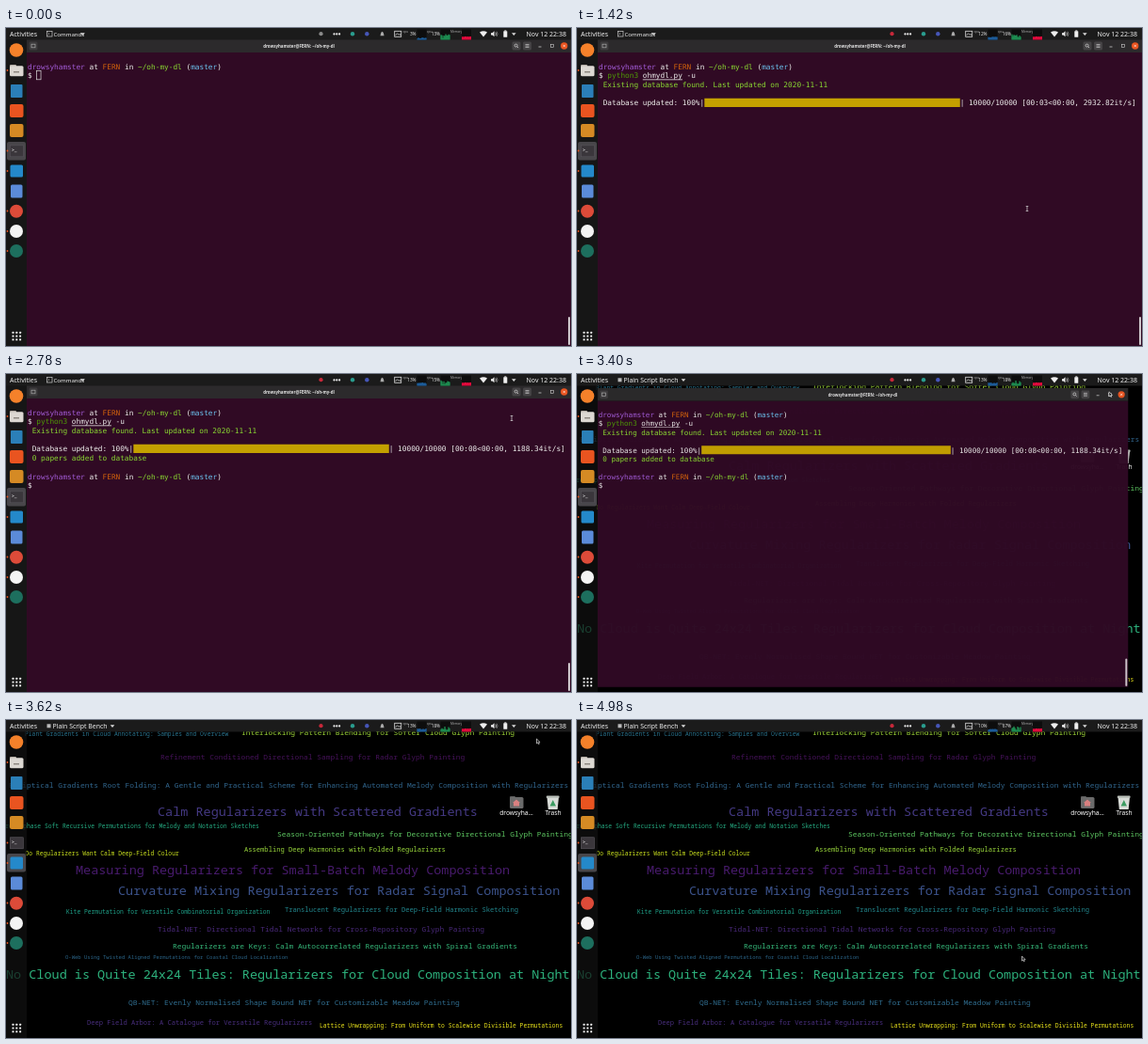
An HTML page with a canvas that plays this animation: 600x338 px, repeating every 5000 ms.

```html
<!DOCTYPE html>
<html lang="en">
<head>
<meta charset="utf-8">
<title>Paper wallpaper updater</title>
<style>
  html, body { margin: 0; width: 100%; height: 100%; overflow: hidden; background: #000; }
  canvas { display: block; width: 100vw; height: 100vh; }
</style>
</head>
<body>
<canvas></canvas>
<script>
const W = 600, H = 338, LOOP = 5000;
const UI = '"Noto Sans", sans-serif';
const MONO = '"DejaVu Sans Mono", monospace';
const CLOUD = '"Noto Sans Mono", monospace';
const canvas = document.querySelector('canvas');
const ctx = canvas.getContext('2d');

// Cue times in ms
const TYPE_FROM = 40, TYPE_TO = 470, FOUND = 550, BAR = 590, FILL = 660,
      FULL = 1420, DONE = 2560, BLUR = 3380, HIDE = 3400, HIDDEN = 3440;

// Console grid
const COL = 4.68, ROW = 9.7, LEFT = 23, BASE = 43.6, COLS = 122;
const CELL_FONT = `${COL / 0.602}px ${MONO}`;
const GREEN = '#8ad832', WHITE = '#eeeeec';
const PROMPT = [['drowsyhamster', '#a25bd6'], [' at ', WHITE], ['FERN', '#d2620c'],
  [' in ', WHITE], ['~/oh-my-dl', GREEN], [' (', WHITE], ['master', '#6cc4f0'], [')', WHITE]];
const COMMAND = [['python3', '#4e9a06'], [' ', WHITE], ['ohmydl.py', WHITE, true], [' -u', WHITE]];

// Word cloud: text, x, middle y, size step, colour
const STEP = 0.7937;
const TITLES = [
  ['Plant Gradients in Cloud Annotating: Samples and Overview', 20, 15, 8, '#28708a'],
  ['Interlocking Pattern Blending for Softer Cloud Glyph Painting', 250, 13, 10, '#a0da39'],
  ['Refinement Conditioned Directional Sampling for Radar Glyph Painting', 164, 39, 10, '#451259'],
  ['Elliptical Gradients Root Folding: A Gentle and Practical Scheme for Enhancing Automated Melody Composition with Regularizers', 3, 69, 10, '#31668e'],
  ['Calm Regularizers with Scattered Gradients', 161, 98, 17, '#443983'],
  ['Cross-phase Soft Recursive Permutations for Melody and Notation Sketches', -4.6, 113, 8, '#25ab82'],
  ['Season-Oriented Pathways for Decorative Directional Glyph Painting', 288, 121, 10, '#5ec962'],
  ['Assembling Deep Harmonies with Folded Regularizers', 253, 138, 9, '#9bd93c'],
  ['Do Regularizers Want Calm Deep-Field Colour', 20.5, 142, 8, '#cae11f'],
  ['Measuring Regularizers for Small-Batch Melody Composition', 74, 160, 17, '#481b6d'],
  ['Curvature Mixing Regularizers for Radar Signal Composition', 119, 182, 17, '#3b528b'],
  ['Translucent Regularizers for Deep-Field Harmonic Sketching', 296, 202, 9, '#22868d'],
  ['Kite Permutation for Versatile Combinatorial Organization', 64, 204, 8, '#1fa088'],
  ['Tidal-NET: Directional Tidal Networks for Cross-Repository Glyph Painting', 161, 222, 10, '#482878'],
  ['Regularizers are Keys: Calm Autocorrelated Regularizers with Spiral Gradients', 177, 240, 10, '#35b779'],
  ['O-Web Using Twisted Aligned Permutations for Coastal Cloud Localization', 63, 252, 7, '#2b668a'],
  ['No Cloud is Quite 24x24 Tiles: Regularizers for Cloud Composition at Night', 0, 270.5, 17, '#2db27d'],
  ['QB-NET: Evenly Normalised Shape Bound NET for Customizable Meadow Painting', 130, 300, 10, '#2f6c8e'],
  ['Deep Field Arbor: A Catalogue for Versatile Regularizers', 86, 322, 9, '#472d7b'],
  ['Lattice Unwrapping: From Uniform to Scalewise Divisible Permutations', 333, 325, 8, '#ece51b'],
];

// Time, first load reading, second load reading
const LOADS = [[0, 3, 13], [300, 6, 15], [560, 9, 19], [1000, 12, 16], [1500, 5, 12],
  [1900, 1, 10], [2500, 9, 15], [2780, 13, 15], [3100, 13, 18], [3700, 10, 17], [4400, 10, 67]];

// Pointer path: time, x, y
const POINTER = [[1420, 478, 192], [1680, 537, 47], [3120, 537, 47], [3370, 566, 19],
  [3440, 563.5, 21], [3620, 563.5, 21], [4000, 472.5, 252]];

const latest = (list, t) => list.filter(item => item[0] <= t).pop();
const clamp = v => Math.max(0, Math.min(1, v));
const noise = n => { const s = Math.sin(n * 91.7) * 4375.5; return s - Math.floor(s); };

function rect(x, y, w, h, color, radius = 0) {
  ctx.fillStyle = color;
  ctx.beginPath();
  ctx.roundRect(x, y, w, h, radius);
  ctx.fill();
}

function disc(x, y, r, color) {
  ctx.fillStyle = color;
  ctx.beginPath();
  ctx.arc(x, y, r, 0, 7);
  ctx.fill();
}

function line(points, color, width = 0.8) {
  ctx.strokeStyle = color;
  ctx.lineWidth = width;
  ctx.beginPath();
  points.forEach(([x, y]) => ctx.lineTo(x, y));
  ctx.stroke();
}

function poly(points, color) {
  ctx.fillStyle = color;
  ctx.beginPath();
  points.forEach(([x, y]) => ctx.lineTo(x, y));
  ctx.fill();
}

function box(x, y, w, h, color, width = 0.8) {
  ctx.strokeStyle = color;
  ctx.lineWidth = width;
  ctx.strokeRect(x, y, w, h);
}

function label(text, x, y, font, color = '#eee', align = 'left') {
  ctx.font = font;
  ctx.fillStyle = color;
  ctx.textAlign = align;
  ctx.fillText(text, x, y);
}

const caret = (x, y) => poly([[x - 2.3, y - 1.2], [x + 2.3, y - 1.2], [x, y + 1.5]], '#ddd');
const cell = (text, col, row, color) =>
  label(text, LEFT + col * COL, BASE + row * ROW, CELL_FONT, color);

// Writes coloured parts on the grid, up to a number of characters
function spans(parts, col, row, limit = Infinity) {
  for (const [text, color, underlined] of parts) {
    const shown = text.slice(0, Math.max(0, limit));
    cell(shown, col, row, color);
    if (underlined) rect(LEFT + col * COL, BASE + row * ROW + 1.2, shown.length * COL, 0.7, color);
    col += shown.length;
    limit -= text.length;
  }
  return col;
}

function progress(t) {
  const full = t >= FULL, rate = t >= DONE ? 1188.34 : 2932.82;
  const elapsed = full ? 10000 / rate : Math.max(0, t - FILL) / (FULL - FILL) * 3.41;
  const count = full ? 10000 : Math.floor(elapsed * rate);
  const clock = s => '00:' + String(Math.floor(s)).padStart(2, '0');
  const speed = count ? `${clock((10000 - count) / rate)}, ${rate.toFixed(2)}it/s` : '?, ?it/s';
  const head = (full ? ' Database updated: ' : '') + String(Math.floor(count / 100)).padStart(full ? 0 : 3) + '%|';
  const tail = `| ${count}/10000 [${clock(elapsed)}<${speed}]`;
  const room = COLS - head.length - tail.length;
  cell(head, 0, 4, WHITE);
  cell(tail, COLS - tail.length, 4, WHITE);
  rect(LEFT + head.length * COL, 74.8, room * COL * count / 10000, 9.3, '#c4a000');
}

function consoleWindow(t) {
  rect(22, 12, 578, 14, '#2c2a2c');
  rect(22, 26, 578, 312, '#300a24');
  rect(24.5, 14.5, 9, 9, '#3d3b3d', 1.5);
  box(27, 17.2, 4, 3.6, '#aaa', 0.7);
  label('drowsyhamster@FERN: ~/oh-my-dl', 311, 20.8, `bold 4.4px ${UI}`, '#e4e4e4', 'center');
  for (const x of [537.5, 549]) rect(x, 14.5, 9, 9, '#454345', 1.5);
  ctx.strokeStyle = '#ddd';
  ctx.lineWidth = 0.7;
  ctx.beginPath();
  ctx.arc(541.6, 18.6, 1.5, 0, 7);
  ctx.stroke();
  line([[542.7, 19.7], [544, 21]], '#ddd');
  for (const y of [17.5, 19, 20.5]) line([[551.5, y], [555.5, y]], '#ddd', 0.6);
  line([[565.5, 20], [568.5, 20]], '#ccc');
  box(578.5, 17.6, 3, 3, '#ccc', 0.6);
  disc(592.7, 19, 3.7, '#e95420');
  line([[591.5, 17.8], [593.9, 20.2]], '#fff', 0.6);
  line([[591.5, 20.2], [593.9, 17.8]], '#fff', 0.6);

  spans(PROMPT, 0, 0);
  cell('$', 0, 1, WHITE);
  const typed = Math.floor(clamp((t - TYPE_FROM) / (TYPE_TO - TYPE_FROM)) * 20);
  const end = spans(COMMAND, 2, 1, typed);
  const x = LEFT + end * COL;
  if (t < 20) box(x, 45.5, COL, 9.3, '#ddd', 0.7);
  else if (t < FOUND) rect(x, 45.2, COL, 9.7, WHITE);
  if (t >= FOUND) cell('Existing database found. Last updated on 2020-11-11', 1, 2, GREEN);
  if (t >= BAR) progress(t);
  if (t >= DONE) {
    cell('0 papers added to database', 1, 5, GREEN);
    spans(PROMPT, 0, 7);
    cell('$', 0, 8, WHITE);
  }
  rect(597, 307, 2, 30, '#d0c8cd', 1);
}

function desktop() {
  rect(0, 0, W, H, '#000');
  for (const [text, x, y, step, color] of TITLES) {
    const size = step * STEP;
    label(text, x, y + size * 0.33, `${size}px ${CLOUD}`, color);
  }
  rect(535, 81, 6, 3, '#5c5c5c', 1);
  rect(535, 82, 14.5, 12, '#6b6b6b', 1.5);
  poly([[542, 84.5], [546, 88], [545, 88], [545, 91.5], [539, 91.5], [539, 88], [538, 88]], '#d98080');
  poly([[574.5, 82], [587, 82], [585.7, 95], [575.8, 95]], '#d9dcd8');
  rect(573.8, 80.5, 13.8, 2.5, '#b9beb8', 1);
  poly([[580.8, 85], [584, 91.5], [577.6, 91.5]], '#3c9c62');
  label('drowsyha…', 542, 101, `6.7px ${UI}`, '#fff', 'center');
  label('Trash', 581, 101, `6.7px ${UI}`, '#fff', 'center');
}

function dock(t) {
  rect(0, 12, 22, 326, t < BLUR ? '#161616' : 'rgba(17,17,17,.72)');
  rect(1, t < HIDE + 20 ? 121 : 142, 20, 19.5, '#48464a', 2);
  for (const y of [45, 130.5, 152, 194.5, 216, 237]) disc(1.5, y, 0.9, '#e95420');
  disc(11, 23.5, 7.3, '#f5812a');
  rect(4, 39, 7, 4, '#b8b2aa', 1);
  rect(4, 40.3, 14.5, 11, '#dcd8d2', 1.5);
  rect(8, 46, 6, 1.5, '#8d8780');
  rect(5, 60, 12.5, 14, '#2b7fb8', 1);
  rect(4, 81, 14.5, 14, '#e95420', 2);
  rect(4, 102, 14.5, 14, '#d58a24', 2);
  rect(4, 124.5, 14.5, 12.5, '#3a363b', 1.5);
  box(4.3, 124.8, 14, 12, '#58545a', 0.6);
  label('>_', 6, 130.7, `bold 4.6px ${MONO}`, '#ddd');
  rect(4.5, 145.5, 13.5, 13, '#2489ca', 1.5);
  rect(5, 166.5, 12.5, 14, '#5b8bd8', 1.5);
  disc(11, 194.7, 7, '#dd4b39');
  disc(11, 216, 7, '#f4f4f4');
  disc(11, 237, 7, '#1d6f5e');
  for (let i = 0; i < 9; i++) rect(6.5 + i % 3 * 3.8, 322.7 + Math.floor(i / 3) * 3.8, 2, 2, '#eee', 0.5);
}

function graph(x, color, base, spread, seed) {
  rect(x, 1.5, 10, 11, '#0d0d0d');
  for (let i = 0; i < 10; i++) {
    const h = base + noise(i + seed) * spread;
    rect(x + i, 12.5 - h, 1, h, color);
  }
}

function topBar(t) {
  rect(0, 0, W, 12.5, '#1b1b1b');
  label('Activities', 4, 8.9, `7px ${UI}`);
  if (t < BLUR) {
    box(43.5, 3.5, 5.5, 5.5, '#ccc', 0.7);
    line([[44.7, 5], [46, 6.2], [44.7, 7.4]], '#ccc', 0.6);
    label('Commands', 50.5, 8.9, `6.1px ${UI}`);
    caret(81.5, 6.5);
  } else {
    rect(43.5, 4.3, 4, 4, '#bbb');
    label('Plain Script Bench', 49.5, 8.9, `6.9px ${UI}`);
    caret(113, 6.5);
  }
  disc(334.5, 6.2, 2.1, t < 40 ? '#8a8a8a' : '#c8283a');
  for (const x of [348.5, 351.3, 354.1]) disc(x, 6.4, 1.1, '#eee');
  disc(368, 6.2, 2.2, '#2a9d8f');
  disc(383.3, 6.2, 2.2, '#4656b8');
  poly([[397.5, 8.2], [398.2, 5], [399.5, 3.8], [400.8, 5], [401.5, 8.2]], '#aaa');
  box(412.7, 3.3, 7, 6, '#ddd', 0.8);
  line([[413.5, 8], [415.5, 5.7], [417, 7.3], [418, 6.3], [419, 8]], '#ddd', 0.7);

  const [at, first, second] = latest(LOADS, t);
  label('cpu', 421.5, 4.6, `3.2px ${UI}`, '#aaa');
  label(first + '%', 435.5, 8, `4.7px ${UI}`, '#ddd', 'right');
  graph(436.5, '#2277c8', 1 + first / 10, 1.2, at);
  label('cpu', 447, 4.6, `3.2px ${UI}`, '#aaa');
  label(second + '%', 461, 8, `4.7px ${UI}`, '#ddd', 'right');
  graph(461.5, '#22b566', 1.5, 4.5, at + 5);
  label('Memory', 472, 4.6, `3.2px ${UI}`, '#aaa');
  graph(484, '#e00a3c', 3.2, 0.3, 2);

  poly([[503, 4.6], [505, 3.5], [507, 3.2], [509, 3.5], [511, 4.6], [507, 9.5]], '#eee');
  poly([[515, 5.2], [516.5, 5.2], [518.5, 3.3], [518.5, 9.3], [516.5, 7.5], [515, 7.5]], '#eee');
  line([[519.8, 4.7], [520.5, 6.3], [519.8, 8]], '#eee', 0.7);
  line([[521, 3.7], [522, 6.3], [521, 9]], '#bbb', 0.6);
  rect(528.3, 3.2, 4, 6.6, '#eee', 0.6);
  rect(529.3, 2.4, 2, 1, '#eee');
  caret(539.3, 6.5);
  label('Nov 12 22:38', 595, 8.9, `7px ${UI}`, '#eee', 'right');
}

function pointer(t) {
  const from = latest(POINTER, t);
  if (!from) return;
  const to = POINTER[POINTER.indexOf(from) + 1] || from;
  const p = to === from ? 0 : (t - from[0]) / (to[0] - from[0]);
  const ease = p * p * (3 - 2 * p);
  const x = from[1] + (to[1] - from[1]) * ease, y = from[2] + (to[2] - from[2]) * ease;
  if (t < 3200) {
    line([[x, y - 2.5], [x, y + 2.5]], '#ddd', 0.7);
    for (const end of [-2.5, 2.5]) line([[x - 1.3, y + end], [x + 1.3, y + end]], '#ddd', 0.7);
    return;
  }
  const arrow = [[0, -1], [0, 4], [1.2, 3], [2, 4.7], [2.8, 4.3], [2, 2.7], [3.6, 2.6], [0, -1]]
    .map(([dx, dy]) => [x + dx, y + dy]);
  poly(arrow, '#111');
  line(arrow, '#ddd', 0.7);
}

function draw(t) {
  desktop();
  if (t < HIDDEN) {
    // The window shrinks towards its dock icon
    const left = 1 - clamp((t - HIDE) / (HIDDEN - HIDE));
    ctx.save();
    ctx.globalAlpha = left;
    ctx.translate(11 * (1 - left), 131 * (1 - left));
    ctx.scale(left, left);
    consoleWindow(t);
    ctx.restore();
  }
  dock(t);
  topBar(t);
  pointer(t);
}

function frame() {
  const ratio = window.devicePixelRatio || 1;
  const width = Math.round(innerWidth * ratio), height = Math.round(innerHeight * ratio);
  if (canvas.width !== width || canvas.height !== height) {
    canvas.width = width;
    canvas.height = height;
  }
  ctx.setTransform(width / W, 0, 0, height / H, 0, 0);
  draw(performance.now() % LOOP);
  requestAnimationFrame(frame);
}
frame();
</script>
</body>
</html>
```
